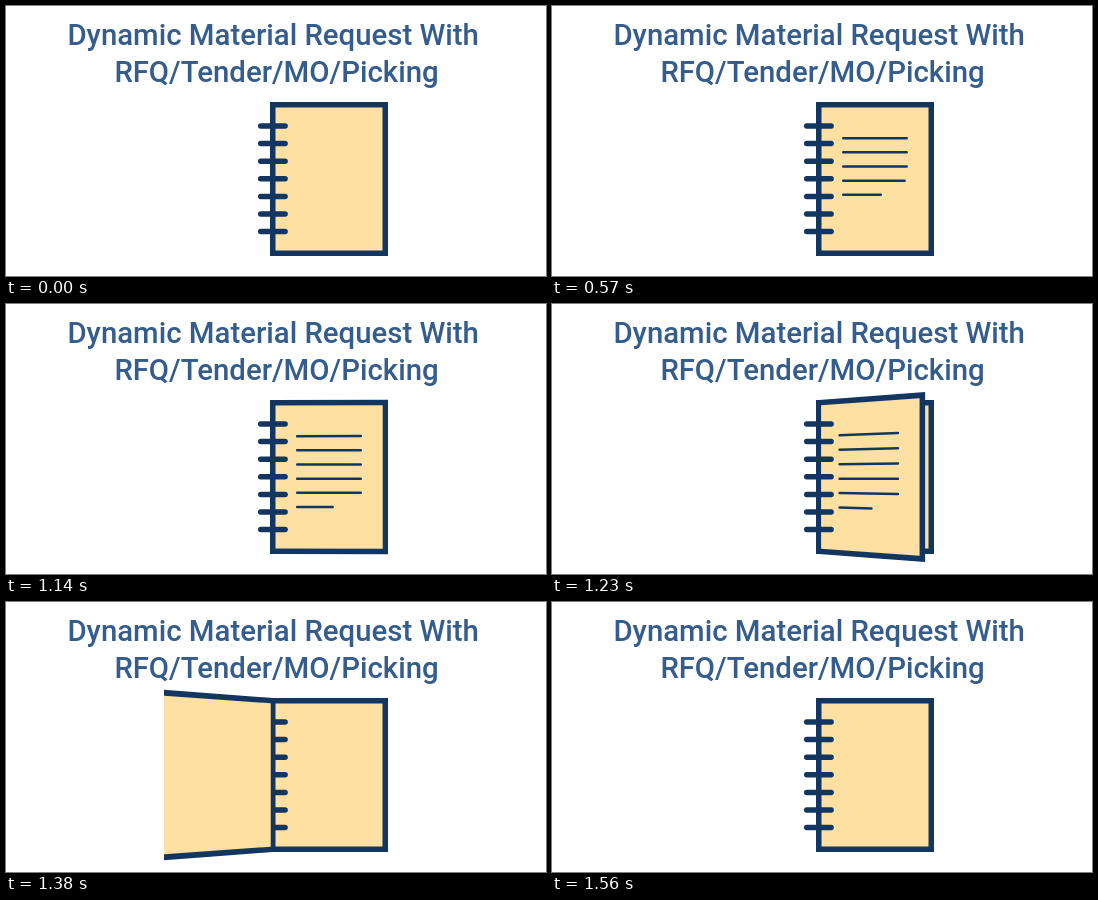
Animation, 540 px wide and 270 px high, one loop 1800 ms. Source, as an HTML page:

```html
<!DOCTYPE html>
<html lang="en">
<head>
<meta charset="utf-8">
<title>Notebook</title>
<style>
  html, body { margin: 0; width: 100%; height: 100%; overflow: hidden; background: #fff; }
  svg { display: block; width: 540px; height: 270px; }
  text { font: 500 29.35px Roboto, sans-serif; fill: #345d8e; text-anchor: middle; }
  .ink { fill: #12365f; }
  .paper { fill: #ffe0a3; }
  .stroke { fill: none; stroke: #12365f; stroke-linecap: round; }
</style>
</head>
<body>
<svg viewBox="0 0 540 270">
  <clipPath id="stage"><rect x="158" y="83" width="224" height="187"/></clipPath>
  <clipPath id="rightOfSpine"><rect x="265" y="83" width="40" height="187"/></clipPath>
  <text x="267.2" y="39">Dynamic Material Request With</text>
  <text x="270.5" y="76">RFQ/Tender/MO/Picking</text>
  <g id="book" clip-path="url(#stage)">
    <g id="base">
      <rect class="ink" x="264" y="96" width="118" height="154"/>
      <rect class="paper" x="269.5" y="101.5" width="107" height="143"/>
    </g>
    <g id="cover">
      <path id="frame" class="ink"/>
      <path id="sheet" class="paper"/>
      <path id="writing" class="stroke" stroke-width="2.5"/>
    </g>
    <path id="rings" class="stroke" stroke-width="5.5"/>
  </g>
</svg>
<script>
const LOOP = 1800, STEP = 30;
const HINGE = 267, EYE_X = 323, EYE_Y = 173, DEPTH = 570;
const [book, base, cover, frame, sheet, writing, rings] =
  ['book', 'base', 'cover', 'frame', 'sheet', 'writing', 'rings'].map(id => document.getElementById(id));

const clamp = v => Math.min(1, Math.max(0, v));
const easeOut = p => 1 - (1 - p) ** 3;
const easeInOut = p => p < .5 ? 2 * p * p : 1 - 2 * (1 - p) ** 2;

rings.setAttribute('d', Array.from({ length: 7 }, (_, i) => `M254.7 ${120 + i * 17.6}H279.1`).join(''));

// Turns a point of the cover around the spine and puts it in perspective.
function project(x, y, angle) {
  const u = x - HINGE;
  const scale = DEPTH / (DEPTH - u * Math.sin(angle));
  return [EYE_X + (HINGE + u * Math.cos(angle) - EYE_X) * scale, EYE_Y + (y - EYE_Y) * scale];
}

function quad(left, top, right, bottom, angle) {
  const corners = [[left, top], [right, top], [right, bottom], [left, bottom]];
  return 'M' + corners.map(([x, y]) => project(x, y, angle)).join('L') + 'Z';
}

function writtenLines(time, angle) {
  let path = '';
  for (let i = 0; i < 6; i++) {
    const progress = easeOut(clamp((time - 155 - i * 90) / 213));
    if (!progress) continue;
    const y = 132.2 + i * 14.15, length = i < 5 ? 63.5 : 35.5;
    path += 'M' + project(291.2, y, angle) + 'L' + project(291.2 + length * progress, y, angle);
  }
  return path;
}

function draw(time) {
  const degrees = 272 * easeInOut(clamp((time - 1115) / 505));
  const angle = degrees * Math.PI / 180;
  const behind = degrees > 180;
  const frontVisible = project(382, EYE_Y, angle)[0] > HINGE && !behind;

  book.insertBefore(cover, behind ? base : rings);
  frame.setAttribute('d', quad(HINGE, 96, 382, 250, angle));
  sheet.setAttribute('d', quad(HINGE + 2.5, 101.5, 376.5, 244.5, angle));
  writing.setAttribute('d', frontVisible ? writtenLines(time, angle) : '');
  rings.setAttribute('clip-path', frontVisible || behind ? 'none' : 'url(#rightOfSpine)');
}

const start = performance.now();
function tick() {
  const time = (performance.now() - start) % LOOP;
  draw(Math.floor(time / STEP) * STEP);
  requestAnimationFrame(tick);
}
tick();
</script>
</body>
</html>
```
